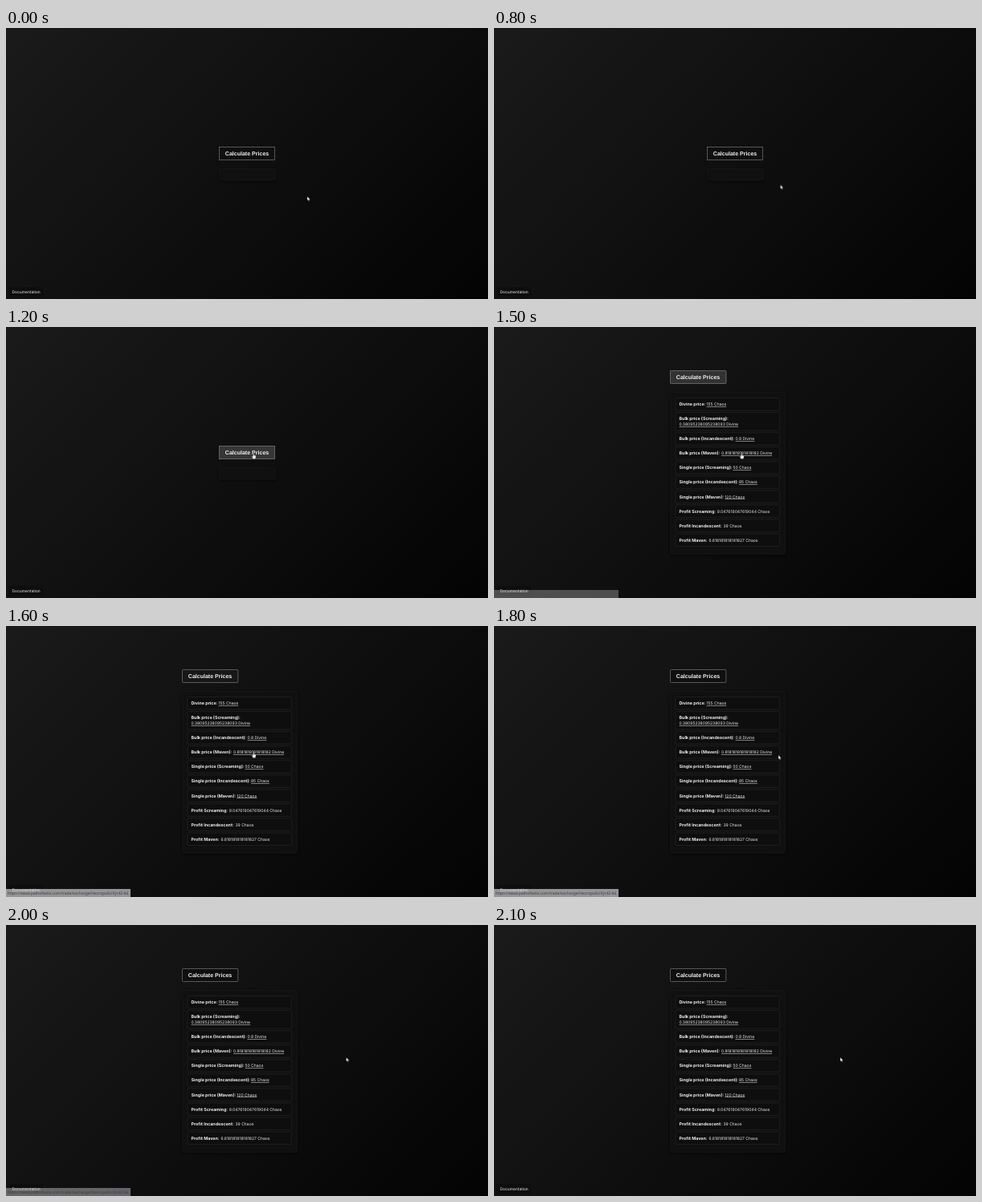
These frames come from a looping animation (600x338 px, 3.9 s). An HTML page:

```html
<!DOCTYPE html>
<html lang="en">
<head>
<meta charset="utf-8">
<title>Price calculator</title>
<style>
  html, body { margin: 0; width: 100%; height: 100%; overflow: hidden; background: #0c0c0d; }
  svg { display: block; width: 100vw; height: 100vh; }
  text { fill: #f0f0f0; font: 5.05px Inter, sans-serif; text-rendering: geometricPrecision; white-space: pre; }
  .label { font-size: 5.36px; font-weight: 700; }
  .link { text-decoration: underline; text-decoration-thickness: .45px; text-underline-offset: .7px; }
  .caption { font: 700 7.05px "Liberation Sans", Arial, sans-serif; }
  .doc { font-size: 4.9px; }
  .url { font: 4.89px "Open Sans", sans-serif; fill: #34363a; }
  .panel { fill: #101011; stroke: #1b1b1c; stroke-width: .7; filter: drop-shadow(0 1px 1.5px #000a); }
  .row { fill: #0e0e0f; stroke: #222223; stroke-width: .8; }
  .button { fill: #0f0f10; stroke: #6a6a6a; stroke-width: .8; }

  /* Every part runs on the same 3.9 s clock and holds each pose. */
  .anim { animation: 3.9s step-end infinite; }
  #before { animation-name: before; }
  #after { animation-name: after; }
  #hover { animation-name: hover; fill: #363637; }
  #leave { animation-name: leave; fill: #323233; }
  #status { animation-name: status; }
  #url { animation-name: url; }
  #cursor { animation-name: move; }
  #arrow { animation-name: arrow; }
  #hand { animation-name: hand; }

  @keyframes before { 0% { opacity: 1 } 38.46%, 100% { opacity: 0 } }
  @keyframes after { 0% { opacity: 0 } 38.46%, 100% { opacity: 1 } }
  @keyframes hover { 0% { opacity: 0 } 28.2% { opacity: .6 } 30.76%, 100% { opacity: 1 } }
  @keyframes leave { 0%, 38.46% { opacity: 1 } 41.02% { opacity: .25 } 43.58%, 100% { opacity: 0 } }
  @keyframes status {
    0% { opacity: 0 } 38.46% { opacity: .32 } 41.02% { opacity: .7 }
    51.28% { opacity: .45 } 53.84%, 100% { opacity: 0 }
  }
  @keyframes url { 0% { opacity: 0 } 41.02% { opacity: 1 } 53.84%, 100% { opacity: 0 } }
  @keyframes move {
    0% { transform: translate(375px, 210px) }
    20.51% { transform: translate(356.5px, 195.5px) }
    23.07% { transform: translate(340px, 182px) }
    25.64% { transform: translate(324px, 169px) }
    28.2% { transform: translate(311px, 159px) }
    30.76% { transform: translate(308px, 156.5px) }
    43.58% { transform: translate(316px, 157.5px) }
    46.15% { transform: translate(354px, 161px) }
    48.71% { transform: translate(397px, 163.3px) }
    51.28% { transform: translate(423.5px, 165px) }
    53.84%, 100% { transform: translate(431px, 165px) }
  }
  @keyframes arrow { 0% { opacity: 1 } 28.2% { opacity: 0 } 46.15%, 100% { opacity: 1 } }
  @keyframes hand { 0% { opacity: 0 } 28.2% { opacity: 1 } 46.15%, 100% { opacity: 0 } }
</style>
</head>
<body>
<svg viewBox="0 0 600 338" preserveAspectRatio="none">
  <defs>
    <linearGradient id="bg" gradientUnits="userSpaceOnUse" x1="66" y1="-65" x2="534" y2="403">
      <stop offset="0" stop-color="#1a1a1b"/>
      <stop offset=".5" stop-color="#0f0f10"/>
      <stop offset="1" stop-color="#030303"/>
    </linearGradient>
  </defs>
  <rect width="600" height="338" fill="url(#bg)"/>

  <rect x="3" y="323" width="43.5" height="12.5" rx="1.5" fill="#0e0e0f"/>
  <text class="doc" x="7.6" y="330.9">Documentation</text>

  <g id="before" class="anim">
    <rect class="panel" x="265.5" y="175.5" width="70" height="14.5" rx="2"/>
    <rect class="button" x="265.5" y="148.5" width="69" height="16"/>
    <rect id="hover" class="button anim" x="265.5" y="148.5" width="69" height="16"/>
    <text class="caption" x="272.8" y="158.7">Calculate Prices</text>
  </g>

  <g id="after" class="anim">
    <rect class="button" x="219.5" y="54.5" width="69.3" height="16" rx=".8"/>
    <rect id="leave" class="button anim" x="219.5" y="54.5" width="69.3" height="16" rx=".8"/>
    <text class="caption" x="226.8" y="64.8">Calculate Prices</text>
    <rect class="panel" x="219.5" y="81.5" width="143" height="202" rx="3"/>
    <g id="rows"></g>
  </g>

  <g id="status" class="anim">
    <rect y="328" width="155" height="10" fill="#cfcfd0"/>
  </g>
  <text id="url" class="url anim" x="1.8" y="334.8">https://www.pathofexile.com/trade/exchange/Necropolis/lQr4Z-b6</text>

  <g id="cursor" class="anim" fill="#fff" stroke="#111" stroke-width=".4" stroke-linejoin="round">
    <path id="arrow" class="anim" d="M0 0V5.2L1.2 4.2L2 6.1L3 5.7L2.2 3.9H3.7Z"/>
    <path id="hand" class="anim" d="M-.6 .6Q0-.3 .6 .6V3.2L2.6 3.7Q3.3 4 3.2 4.8L2.6 8H-.5L-2.2 5.2Q-2.2 4.3-1.4 4.5L-.6 5.2Z"/>
  </g>
</svg>
<script>
  // label, value, value x
  const rows = [
    ["Divine price:", "155 Chaos", 264.5],
    ["Bulk price (Screaming):", "0.38095238095238093 Divine", 230.5],
    ["Bulk price (Incandescent):", "0.8 Divine", 300.5],
    ["Bulk price (Maven):", "0.8181818181818182 Divine", 283],
    ["Single price (Screaming):", "50 Chaos", 297.5],
    ["Single price (Incandescent):", "85 Chaos", 305],
    ["Single price (Maven):", "120 Chaos", 287.3],
    ["Profit Screaming:", "9.047619047619044 Chaos", 277.8],
    ["Profit Incandescent:", "39 Chaos", 285.5],
    ["Profit Maven:", "6.818181818181827 Chaos", 267.5]
  ];
  const labelX = 230.5;
  const list = document.getElementById("rows");

  function add(tag, attrs, text = "") {
    const el = document.createElementNS("http://www.w3.org/2000/svg", tag);
    for (const key in attrs) el.setAttribute(key, attrs[key]);
    el.textContent = text;
    list.append(el);
  }

  let rowY = 88.6;
  for (const [label, value, x] of rows) {
    const wrap = x === labelX ? 7 : 0;
    const y = rowY + 9.6;
    add("rect", { class: "row", x: 226, y: rowY, width: 129.6, height: 15.4 + wrap, rx: 1.2 });
    add("text", { class: "label", x: labelX, y }, label);
    add("text", { class: label.startsWith("Profit") ? "" : "link", x, y: y + wrap }, value);
    rowY += 18.05 + wrap;
  }
</script>
</body>
</html>
```
